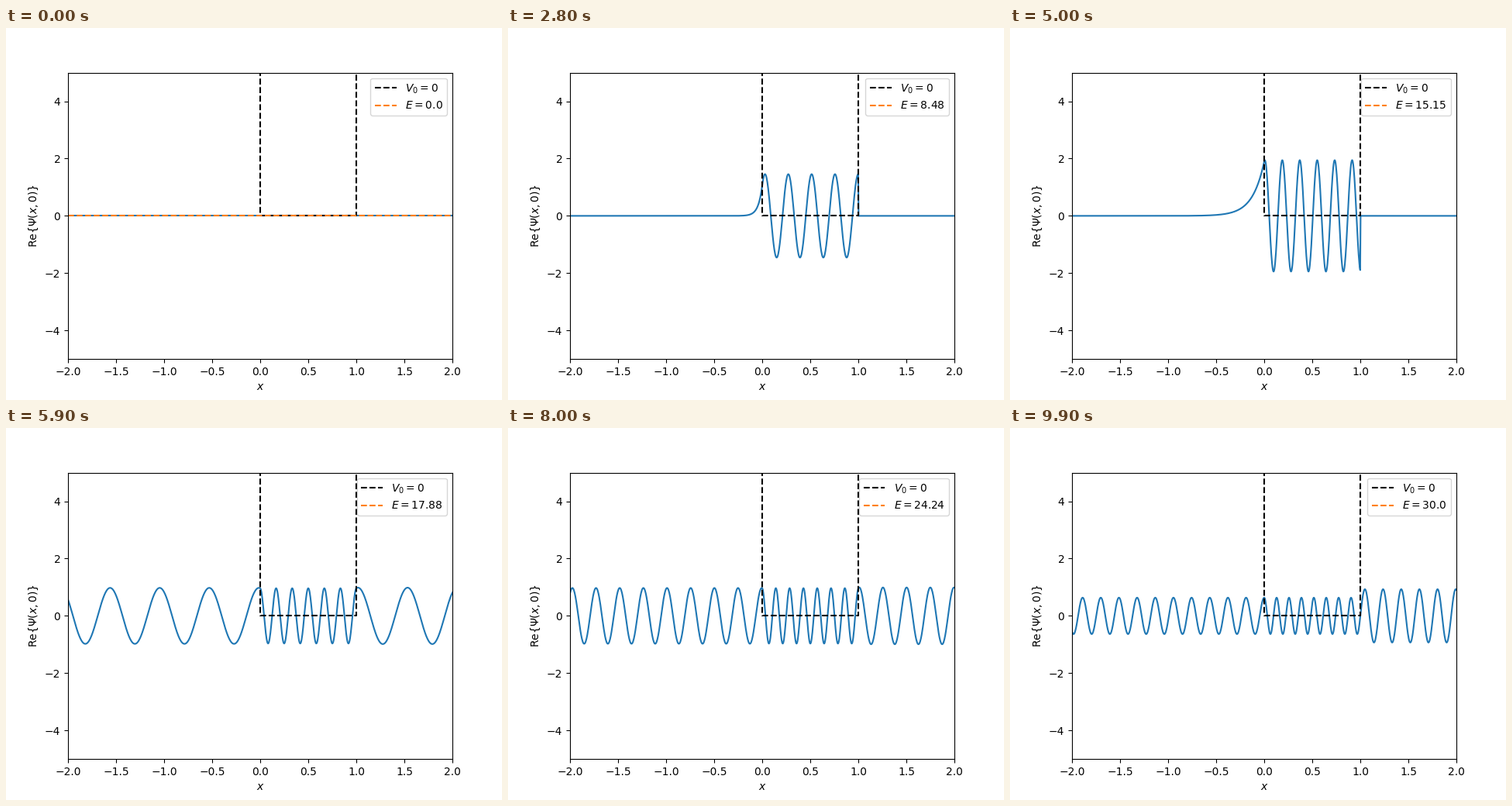
Recreate the animation shown at these times as a matplotlib script. Size 640 px wide and 480 px high, loop 10000 ms.

```python
import numpy as np
import matplotlib.pyplot as plt
from matplotlib.animation import FuncAnimation

FRAMES = 100
DEPTH = 16.0      # potential outside the well 0 < x < 1
E_MAX = 30.0

x = np.linspace(-2, 2, 1000)
left, right = x < 0, x > 1
inside = ~(left | right)


def wave_number(energy):
    """Wave number in units where h = m = 1."""
    return 2 * np.pi * np.sqrt(2 * energy)


def bound(E):
    """Wave in the well, reflected at a wall higher than its energy."""
    k, kappa = wave_number(E), wave_number(DEPTH - E)
    amp = 2 * E / DEPTH
    slope = 2 * np.sqrt(E * (DEPTH - E)) / DEPTH
    psi = np.empty_like(x)
    psi[left] = amp * np.exp(kappa * x[left])
    psi[inside] = amp * np.cos(k * x[inside]) + slope * np.sin(k * x[inside])
    psi[right] = amp * np.exp(-kappa * x[right])
    return psi


def scattered(E):
    """Unit plane wave coming from the left and crossing the well."""
    k, q = wave_number(E - DEPTH), wave_number(E)
    t = 1 / (np.cos(q) - 0.5j * (k / q + q / k) * np.sin(q))
    r = 0.5j * (q / k - k / q) * np.sin(q) * t
    psi = np.empty(x.size, dtype=complex)
    psi[left] = np.exp(1j * k * x[left]) + r * np.exp(-1j * k * x[left])
    psi[inside] = ((1 + r) * np.cos(q * x[inside])
                   + 1j * k / q * (1 - r) * np.sin(q * x[inside]))
    psi[right] = t * np.exp(1j * k * (x[right] - 1))
    return psi.real


fig, ax = plt.subplots(figsize=(6.4, 4.8), dpi=100)
ax.set(xlim=(-2, 2), ylim=(-5, 5), xlabel="$x$",
       ylabel=r"Re$\{\Psi(x,0)\}$")
wave, = ax.plot(x, np.zeros_like(x), color="C0")
ax.plot([0, 0, 1, 1], [DEPTH, 0, 0, DEPTH], "k--", label="$V_0=0$")
level, = ax.plot([-2, 2], [0, 0], "--", color="C1")


def update(i):
    E = E_MAX * i / (FRAMES - 1)
    wave.set_ydata(bound(E) if E < DEPTH else scattered(E))
    level.set_ydata([E, E])
    level.set_label(f"$E={round(E, 2)}$")
    # the legend makes way while the energy line crosses its corner
    ax.legend(loc="lower left" if 3.5 < E < 4.8 else "upper right")
    return wave, level


anim = FuncAnimation(fig, update, frames=FRAMES, init_func=lambda: update(0),
                     interval=100, repeat=True, repeat_delay=0, blit=False)
plt.show()
```
